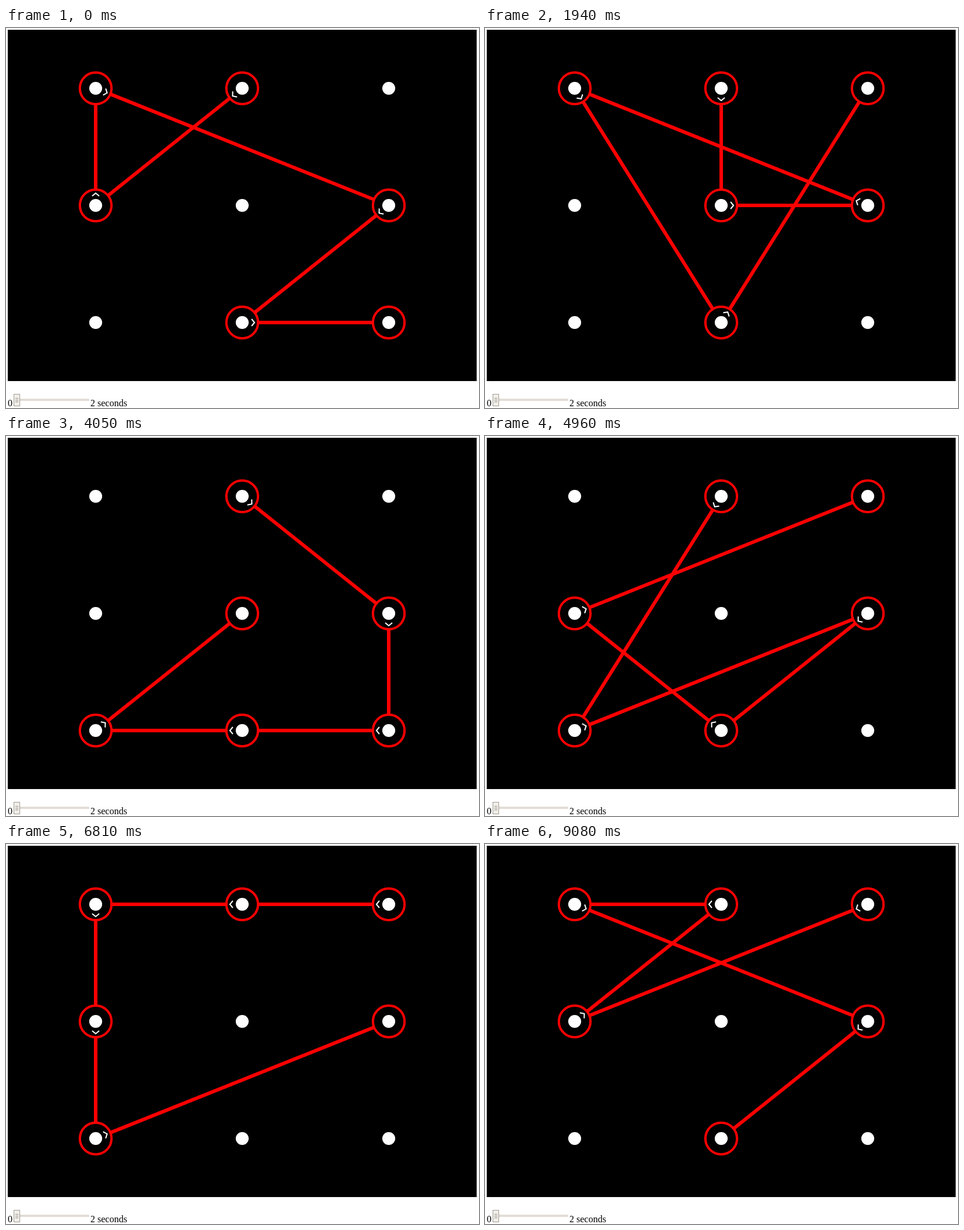
Animation of 807 by 649 pixels, one loop 9180 ms. Source, as an HTML page with a canvas:

```html
<!DOCTYPE html>
<html lang="en">
<head>
<meta charset="utf-8">
<title>Unlock patterns</title>
<style>
  html, body { margin: 0; width: 100%; height: 100%; overflow: hidden; background: #fff; }
  canvas { position: absolute; left: 0; top: 0; }
  span {
    position: absolute; top: 632px; color: #000; white-space: nowrap;
    font: 16px/18px "Liberation Serif", "Times New Roman", serif;
  }
</style>
</head>
<body>
<canvas id="stage" width="807" height="649"></canvas>
<span style="left:3px">0</span>
<span style="left:144px">2 seconds</span>
<script>
const ctx = document.getElementById('stage').getContext('2d');
const LOOP = 9180;
const SIZE = 6;
const RED = '#f00';

// Known patterns by time; the search runs evenly between them.
const KEYS = [
  [0, '130578'], [1940, '145072'], [3150, '154367'], [4960, '165732'],
  [6020, '184670'], [7620, '214670'], [9080, '231057']
];

// Redraw times: first, last, count.
const RUNS = [
  [0, 0, 1], [60, 950, 17], [1010, 1890, 17], [1940, 2850, 18], [2900, 3780, 18],
  [3830, 4700, 18], [4750, 5650, 18], [5700, 6590, 18], [6650, 7550, 18],
  [7620, 8500, 18], [8550, 9080, 11]
];

const col = n => n % 3;
const row = n => Math.floor(n / 3);
const nodeX = n => 153 + 250 * col(n);
const nodeY = n => 103 + 200 * row(n);

// A move is a jump when another node lies halfway along it.
function isJump(a, b) {
  return (col(a) + col(b)) % 2 === 0 && (row(a) + row(b)) % 2 === 0;
}

// All patterns without jumps, in counting order.
function listPatterns() {
  const found = [];
  (function extend(path) {
    if (path.length === SIZE) {
      found.push(path);
      return;
    }
    for (let n = 0; n < 9; n++) {
      if (path.includes(n)) continue;
      if (path && isJump(+path[path.length - 1], n)) continue;
      extend(path + n);
    }
  })('');
  return found;
}

const patterns = listPatterns();
const marks = KEYS.map(([time, path]) => [time, patterns.indexOf(path)]);

function snap(time) {
  const near = KEYS.find(([t]) => Math.abs(t - time) < 15);
  return near ? near[0] : Math.floor(time / 10 + 1e-6) * 10;
}

const ticks = RUNS.flatMap(([first, last, count]) =>
  Array.from({ length: count }, (_, i) =>
    snap(first + (last - first) * i / Math.max(1, count - 1))));

function patternAt(time) {
  let i = 0;
  while (i < marks.length - 2 && marks[i + 1][0] <= time) i++;
  const [t0, a] = marks[i];
  const [t1, b] = marks[i + 1];
  return patterns[Math.round(a + (b - a) * (time - t0) / (t1 - t0))];
}

function disc(x, y, r, fill) {
  ctx.beginPath();
  ctx.arc(x, y, r, 0, 2 * Math.PI);
  ctx.fillStyle = fill;
  ctx.fill();
}

function box(x, y, w, h, fill) {
  ctx.fillStyle = fill;
  ctx.fillRect(x, y, w, h);
}

function drawArrow(from, to) {
  ctx.save();
  ctx.translate(nodeX(from), nodeY(from));
  ctx.rotate(Math.atan2(nodeY(to) - nodeY(from), nodeX(to) - nodeX(from)));
  ctx.beginPath();
  ctx.moveTo(16, -6);
  ctx.lineTo(21, 0);
  ctx.lineTo(16, 6);
  ctx.strokeStyle = '#fff';
  ctx.lineWidth = 2;
  ctx.stroke();
  ctx.restore();
}

function drawPattern(path) {
  const nodes = [...path].map(Number);
  ctx.strokeStyle = RED;
  ctx.lineWidth = 6;
  ctx.beginPath();
  nodes.forEach(n => ctx.lineTo(nodeX(n), nodeY(n)));
  ctx.stroke();

  ctx.lineWidth = 4;
  for (const n of nodes) {
    disc(nodeX(n), nodeY(n), 27, '#000');
    ctx.stroke();
  }
  for (let n = 0; n < 9; n++) disc(nodeX(n), nodeY(n), 11, '#fff');
  for (let i = 1; i < nodes.length; i++) drawArrow(nodes[i - 1], nodes[i]);
}

function drawSlider() {
  box(24, 633, 118, 4, '#e2ddd5');
  box(13, 625, 11, 21, '#a29b8f');
  box(14, 626, 9, 19, '#f0eeea');
  for (const y of [632, 635, 638]) box(16, y, 5, 1, '#958e83');
}

function draw(path) {
  box(0, 0, 807, 649, '#fff');
  box(3, 3, 800, 600, '#000');
  drawPattern(path);
  drawSlider();
}

const start = performance.now();
let shown = '';

function frame() {
  const time = (performance.now() - start) % LOOP;
  let tick = 0;
  for (const t of ticks) if (t <= time) tick = t;
  const path = patternAt(tick);
  if (path !== shown) draw(shown = path);
  requestAnimationFrame(frame);
}
frame();
</script>
</body>
</html>
```
